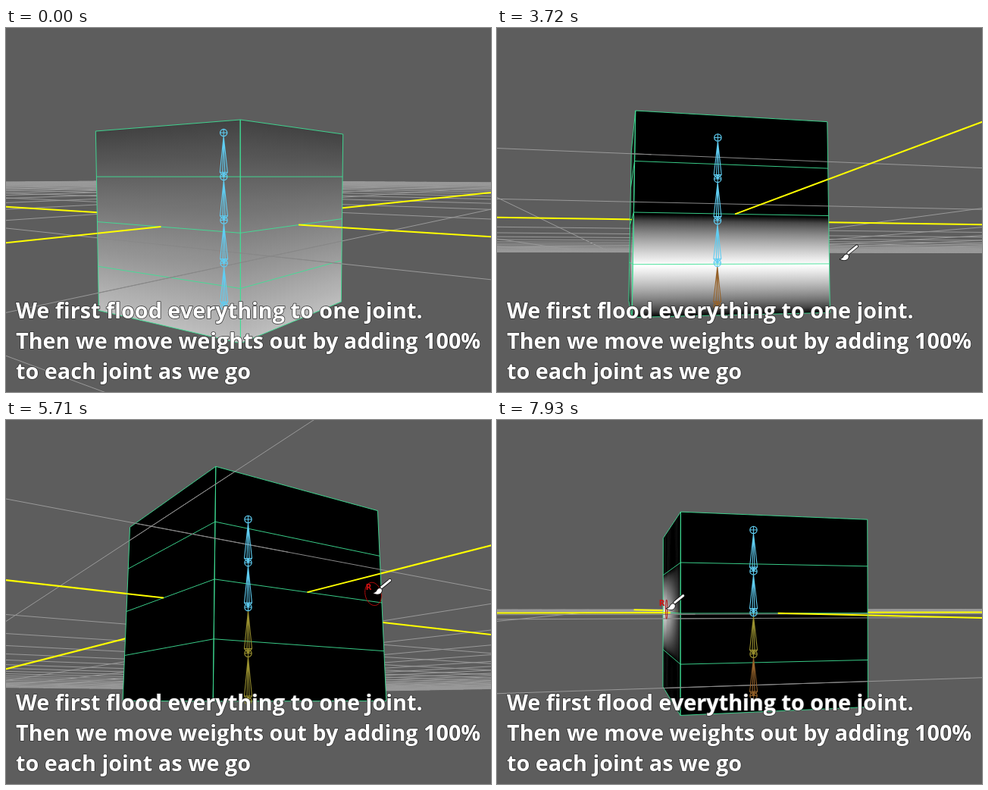
These frames come from a looping animation (640 px wide and 480 px high, 8 s). An HTML page with a canvas:

```html
<!DOCTYPE html>
<html lang="en">
<head>
<meta charset="utf-8">
<title>Painting joint weights</title>
<style>
  html, body { margin: 0; width: 100%; height: 100%; overflow: hidden; background: #5d5d5d; }
  canvas, svg { position: absolute; left: 0; top: 0; width: 640px; height: 480px; }
  text { font: 700 28.8px "Open Sans", "Noto Sans", sans-serif; fill: #fff;
         stroke: #333; stroke-width: 1.6px; stroke-linejoin: round; paint-order: stroke; }
</style>
</head>
<body>
<canvas id="stage" width="640" height="480"></canvas>
<svg viewBox="0 0 640 480">
  <text x="13" y="382.5">We first flood everything to one joint.</text>
  <text x="13" y="422.5">Then we move weights out by adding 100%</text>
  <text x="13" y="462.5">to each joint as we go</text>
</svg>
<script>
const ctx = document.getElementById('stage').getContext('2d');
const LOOP = 8000, FOCAL = 707, GRID = 44, NEAR = 0.05;
const FLOODED = 1100, FIRST_JOINT = 2690, SECOND_JOINT = 5710;
const PAINT_TIME = 110, BRUSH_RADIUS = 0.06;

// The camera rests in each pose, then orbits to the next; x, y place the cube centre.
const poses = [
  { arrive: 0, leave: FIRST_JOINT, yaw: 36.4, pitch: 3.56, dist: 6.17, x: 287.5, y: 253.5 },
  { arrive: FIRST_JOINT, leave: 3760, yaw: -12.5, pitch: -5, dist: 6.36, x: 291, y: 254 },
  { arrive: 4460, leave: 4890, yaw: 101.6, pitch: -9.4, dist: 6.38, x: 350, y: 257 },
  { arrive: 5480, leave: 5720, yaw: 146.4, pitch: -10.3, dist: 5.83, x: 319.5, y: 247 },
  { arrive: 6430, leave: 6560, yaw: 175.3, pitch: 1.13, dist: 5.95, x: 302, y: 254 },
  { arrive: 7700, leave: LOOP, yaw: 257, pitch: -0.79, dist: 6.47, x: 338.5, y: 254 }
];

// The brush slides over a cube face; a stroke may end by painting a corner.
const strokes = [
  { start: FIRST_JOINT, end: 2850, face: 0, u: [0.19, 0], v: 0.75, paints: 0 },
  { start: 2850, end: 3480, face: 0, u: [0, 1.06], v: 0.73, paints: 1 },
  { start: 4460, end: 4790, face: 1, u: [0, 1], v: 0.75, paints: 2 },
  { start: 4890, end: 5480, face: 2, u: [0, 1], v: 0.75, paints: 3 },
  { start: SECOND_JOINT, end: 6430, face: 2, u: [0.94, 0.06], v: 0.46 },
  { start: 6430, end: 6580, face: 2, u: [0.06, 0], v: 0.46, paints: 2 },
  { start: 6580, end: 7930, face: 2, u: [0, 0.25], v: 0.48 }
];

// Cube corners as [x, z]; face i spans corner i (left) to i + 1 (right).
const corners = [[-1, -1], [1, -1], [1, 1], [-1, 1]];

const clamp = v => Math.min(1, Math.max(0, v));
const mix = (a, b, k) => a + (b - a) * k;
const ease = k => k * k * (3 - 2 * k);
const gray = v => `rgb(${v},${v},${v})`;
const range = n => Array.from({ length: n }, (_, i) => i);

function poseAt(t) {
  const i = poses.findLastIndex(pose => pose.arrive <= t);
  const a = poses[i], b = poses[i + 1] || a;
  const k = t < a.leave ? 0 : ease((t - a.leave) / (b.arrive - a.leave));
  return Object.fromEntries(Object.keys(a).map(key => [key, mix(a[key], b[key], k)]));
}

function makeCamera(t) {
  const pose = poseAt(t);
  const a = pose.yaw * Math.PI / 180, p = pose.pitch * Math.PI / 180;
  const view = ([x, y, z]) => {
    const depth = z * Math.cos(a) - x * Math.sin(a);
    return [
      x * Math.cos(a) + z * Math.sin(a) + (pose.x - 320) * pose.dist / FOCAL,
      y * Math.cos(p) + depth * Math.sin(p) - (pose.y - 240) * pose.dist / FOCAL,
      depth * Math.cos(p) - y * Math.sin(p) + pose.dist
    ];
  };
  const project = point => {
    const [x, y, z] = view(point);
    return [320 + FOCAL * x / z, 240 - FOCAL * y / z];
  };
  return { view, project };
}

// Keeps the part of a segment where distance is positive.
function clipSegment([p, q], distance) {
  const a = distance(p), b = distance(q);
  if (a <= 0 && b <= 0) return null;
  const cut = p.map((v, i) => mix(v, q[i], a / (a - b)));
  return a < 0 ? [cut, q] : b < 0 ? [p, cut] : [p, q];
}

function polyline(points) {
  points.forEach(([x, y], i) => i ? ctx.lineTo(x, y) : ctx.moveTo(x, y));
}

function strokeLines(lines, color, width) {
  ctx.beginPath();
  lines.forEach(polyline);
  ctx.strokeStyle = color;
  ctx.lineWidth = width;
  ctx.stroke();
}

function drawGround(camera, gridColor, distance) {
  const draw = (segment, color, width) => {
    if (distance) segment = clipSegment(segment, distance);
    segment = segment && clipSegment(segment, p => camera.view(p)[2] - NEAR);
    if (segment) strokeLines([segment.map(camera.project)], color, width);
  };
  const drawPair = (k, color, width) => {
    draw([[-GRID, 0, k], [GRID, 0, k]], color, width);
    draw([[k, 0, -GRID], [k, 0, GRID]], color, width);
  };
  for (let k = 2; k <= GRID; k += 2) {
    drawPair(k, gridColor, 1);
    drawPair(-k, gridColor, 1);
  }
  drawPair(0, '#ff0', 2);
}

// Brightness at height v (0 top, 1 bottom) for a painted weight.
function shade(t, v, weight) {
  if (t < FLOODED) return 66 + 124 * v;
  if (t < FIRST_JOINT) return 255;
  const peak = t < SECOND_JOINT ? 0.75 : 0.5;
  const tent = Math.max(0, 1 - 4 * Math.abs(v - peak)) * weight;
  return 255 * Math.pow(tent, 1 / 1.6);
}

function cornerWeight(t, corner) {
  const stageStart = t < SECOND_JOINT ? FIRST_JOINT : SECOND_JOINT;
  const stroke = strokes.find(s => s.start >= stageStart && s.paints === corner % 4);
  return stroke ? clamp((t - stroke.end) / PAINT_TIME + 1) : 0;
}

function makeFace(camera, i) {
  const [x0, z0] = corners[i], [x1, z1] = corners[(i + 1) % 4];
  const at = (u, v) => camera.project([mix(x0, x1, u), 1 - 2 * v, mix(z0, z1, u)]);
  return {
    i, at,
    outline: [at(0, 0), at(1, 0), at(1, 1), at(0, 1)],
    inFront: ([x, , z]) => x * (x0 + x1) / 2 + z * (z0 + z1) / 2 - 1,
    visible: at(1, 0.5)[0] > at(0, 0.5)[0]
  };
}

function fillFace(face, t) {
  const strips = 24, stops = 32;
  const left = cornerWeight(t, face.i), right = cornerWeight(t, face.i + 1);
  for (const s of range(strips)) {
    const u0 = s / strips, mid = (s + 0.5) / strips;
    const u1 = Math.min(1, (s + 1.3) / strips);
    const gradient = ctx.createLinearGradient(0, face.at(mid, 0)[1], 0, face.at(mid, 1)[1]);
    for (const k of range(stops + 1)) {
      const v = k / stops;
      gradient.addColorStop(v, gray(Math.round(shade(t, v, mix(left, right, mid)))));
    }
    ctx.beginPath();
    polyline([face.at(u0, 0), face.at(u1, 0), face.at(u1, 1), face.at(u0, 1)]);
    ctx.fillStyle = gradient;
    ctx.fill();
  }
}

function drawCube(camera, faces, t) {
  const visible = faces.filter(face => face.visible);
  visible.forEach(face => fillFace(face, t));
  const edges = visible.flatMap(({ at }) => [
    ...range(5).map(row => [at(0, row / 4), at(1, row / 4)]),
    [at(0, 0), at(0, 1)], [at(1, 0), at(1, 1)]
  ]);
  strokeLines(edges, '#3fe096', 0.9);

  // Ground lines that pass between the viewer and the cube.
  ctx.save();
  ctx.beginPath();
  visible.forEach(face => { polyline(face.outline); ctx.closePath(); });
  ctx.clip();
  visible.forEach(face => drawGround(camera, '#888', face.inFront));
  ctx.restore();
}

function boneColor(t, i) {
  const blue = '#5fcdf2', olive = '#99902f', brown = '#95622a';
  if (t < FIRST_JOINT || i < 2) return blue;
  if (t < SECOND_JOINT) return i < 3 ? blue : brown;
  return i < 3 || t < 6000 ? olive : brown;
}

function drawSkeleton(camera, t) {
  const joints = range(5).map(i => camera.project([0, 1 - i / 2, 0]));
  for (const i of range(4)) {
    const tip = joints[i], root = joints[i + 1];
    const base = dx => [mix(tip[0], root[0], 0.9) + dx, mix(tip[1], root[1], 0.9)];
    const start = [tip[0], tip[1] + 5];
    strokeLines([
      [start, base(-5), root, base(5), start],
      [start, base(-1.5), root], [start, base(1.5), root],
      [base(-5), base(5)]
    ], boneColor(t, i), 1.1);
  }
  joints.forEach(([x, y], i) => {
    strokeLines([[[x - 4.5, y], [x + 4.5, y]], [[x, y - 4.5], [x, y + 4.5]]], boneColor(t, i - 1), 1);
    ctx.beginPath();
    ctx.arc(x, y, 4.6, 0, 2 * Math.PI);
    ctx.lineWidth = 1.3;
    ctx.stroke();
  });
}

function drawBrush(faces, t) {
  const stroke = strokes.findLast(s => s.start <= t);
  if (!stroke) return;
  const face = faces[stroke.face];
  const u = mix(...stroke.u, ease(clamp((t - stroke.start) / (stroke.end - stroke.start))));
  const [x, y] = face.at(u, stroke.v);

  if (face.visible && u <= 1) {
    const ring = range(33).map(k => {
      const angle = k / 16 * Math.PI;
      return face.at(u + BRUSH_RADIUS * Math.cos(angle), stroke.v + BRUSH_RADIUS * Math.sin(angle));
    });
    strokeLines([ring], '#b00c0c', 1);
    ctx.fillStyle = '#d01212';
    ctx.font = '700 10px "DejaVu Sans", sans-serif';
    ctx.fillText('R', x - 10, y - 5);
  }

  ctx.save();
  ctx.translate(x, y);
  ctx.lineCap = 'round';
  const handle = [[[11, -9], [22, -18]]];
  strokeLines(handle, '#111', 4.6);
  ctx.beginPath();
  ctx.moveTo(0, -1);
  ctx.quadraticCurveTo(4, -2, 5, -5);
  ctx.quadraticCurveTo(8, -9, 11, -6);
  ctx.quadraticCurveTo(12, -2, 8, 0);
  ctx.quadraticCurveTo(4, 1, 0, -1);
  ctx.lineWidth = 1.6;
  ctx.stroke();
  ctx.fillStyle = '#fff';
  ctx.fill();
  strokeLines(handle, '#fff', 3);
  ctx.restore();
}

function render() {
  const t = performance.now() % LOOP;
  const camera = makeCamera(t);
  const faces = range(4).map(i => makeFace(camera, i));
  ctx.fillStyle = '#5d5d5d';
  ctx.fillRect(0, 0, 640, 480);
  drawGround(camera, '#999');
  drawCube(camera, faces, t);
  drawSkeleton(camera, t);
  drawBrush(faces, t);
  requestAnimationFrame(render);
}
render();
</script>
</body>
</html>
```
